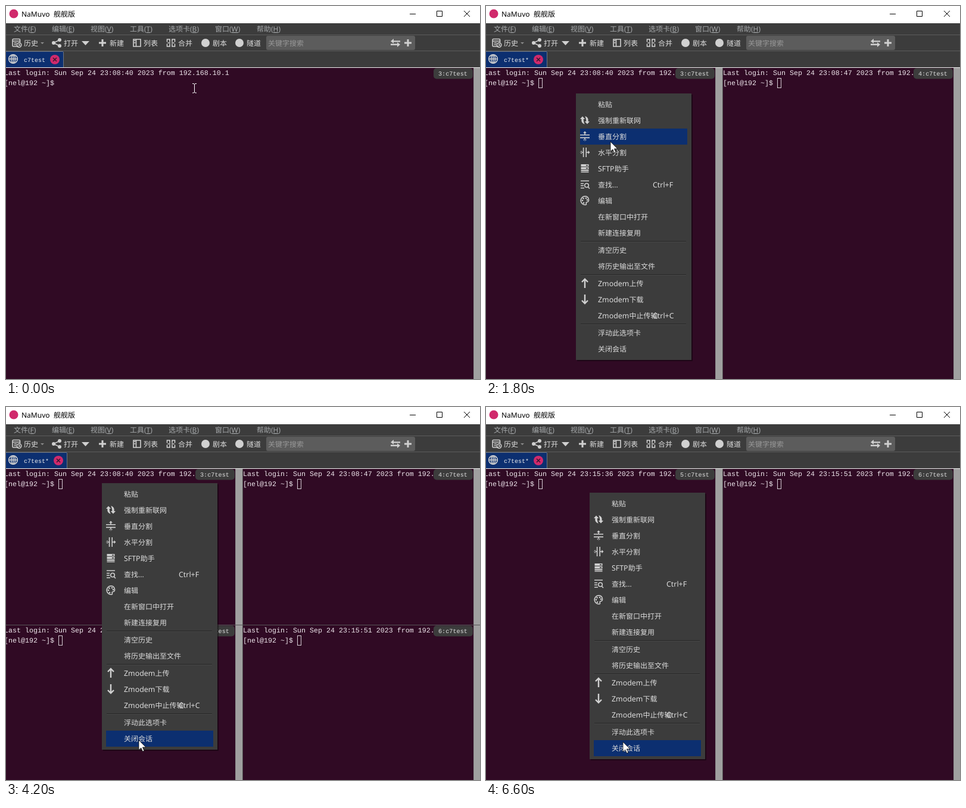
These frames come from a looping animation (796x627 px, 7.2 s). An HTML page:

```html
<!DOCTYPE html>
<html lang="zh-CN">
<head>
<meta charset="utf-8">
<title>Terminal panes</title>
<style>
html, body { margin: 0; width: 100%; height: 100%; overflow: hidden; background: #300a24; }
svg { display: block; }
text { font: 12px "Noto Sans", "Noto Sans CJK SC", "Noto Sans CJK", sans-serif; fill: #dcdcdc; text-rendering: geometricPrecision; white-space: pre; }
.latin { font-size: 12.4px; }
.title { fill: #000; }
.hint { fill: #999; }
.bar { fill: #a6a9ab; }
.term { font: 11.667px "Liberation Mono", monospace; fill: #eee6ec; }
.tag { font: 10.2px "Liberation Mono", monospace; fill: #e0e0e0; }
.tab { font: 10px "Liberation Mono", monospace; fill: #f0f0f0; }
.ico { fill: none; stroke: #d0d0d0; stroke-width: 1.6; }
.fill { fill: #d0d0d0; }
</style>
</head>
<body>
<svg width="796" height="627" viewBox="0 0 796 627">
  <g id="chrome"></g>
  <g id="scene"></g>
</svg>
<script>
const LOOP = 7200, STEP = 600;
const GREY = '#3c3c3c', BLUE = '#0c2f70', WINE = '#300a24', PINK = '#d02a6c', EDGE = '#565456';

const rect = (x, y, w, h, fill, more = '') =>
  `<rect x="${x}" y="${y}" width="${w}" height="${h}" fill="${fill}" ${more}/>`;
const text = (x, y, s, cls = '') => `<text x="${x}" y="${y}" class="${cls}">${s}</text>`;
const label = (x, y, s) => text(x, y, s.replace(/[A-Za-z+]+/g, '<tspan class="latin">$&</tspan>'));
const line = d => `<path class="ico" d="${d}"/>`;
const solid = d => `<path class="fill" d="${d}"/>`;
const dot = (x, y, r, fill) => `<circle cx="${x}" cy="${y}" r="${r}" fill="${fill}"/>`;
const at = (x, y, s) => `<g transform="translate(${x} ${y})">${s}</g>`;
const turn = (deg, s) => `<g transform="rotate(${deg})">${s}</g>`;

// Icons are drawn around their own centre.
const split = solid('M-8-3H8v1.6H-8zM-8 1.6H8v1.6H-8zM-.8-8h1.6v5h-1.6zM-.8 3h1.6v5h-1.6zM-3-5.4L0-8.4 3-5.4zM-3 5.4L0 8.4 3 5.4z');
const upArrow = '<path class="ico" style="stroke-width:2.4" d="M0 8V-6M-5-2L0-7 5-2"/>';
const hook = solid('M-4-6.5L.3-2H-2.300C-2.300 1.500-1.500 4-.3 6.700C-5 5.500-6.300 1.500-5.500-2H-8z');
const icons = {
  history: line('M3 6H-5.5Q-7 6-7 4.5V-5Q-7-6.5-5.5-6.5H4Q5.5-6.5 5.5-5V-1M-7-3H5.5M-4.5 0H0M-4.5 3H-1') +
    '<circle class="ico" cx="4" cy="3.5" r="3.7"/>' + line('M4 1.5V4H6'),
  share: line('M5-5L-5 0 5 5') + solid('M-8 0a3 3 0 1 0 6 0a3 3 0 1 0-6 0M2-5a3 3 0 1 0 6 0a3 3 0 1 0-6 0M2 5a3 3 0 1 0 6 0a3 3 0 1 0-6 0'),
  plus: solid('M-1.5-6h3v4.5H6v3H1.500V6h-3V1.500H-6v-3h4.500z'),
  list: line('M-6-6H6V6H-6zM-1.5-6V6') + solid('M-5-4.5h2.500V-3H-5zM-5-1h2.500V.5H-5z'),
  merge: line('M-6.5-1.5V-6H-2V-1.5M-6.5 1.5V6H-2V1.5M6.5-1.5V-6H2V-1.5M6.5 1.5V6H2V1.5M-5.5 0H-1M1 0H5.5'),
  disc: dot(0, 0, 7, '#d0d0d0'),
  swap: solid('M8-3.8H-3V-7L-8-2.8-3 1V-1.6H8zM-8 3.9H3V7L8 2.8 3-1V1.600H-8z'),
  globe: '<circle class="ico" r="7.3"/><ellipse class="ico" rx="3.4" ry="7.3"/>' + line('M-7 0H7M0-7V7'),
  redo: hook + turn(180, hook),
  rows: split,
  cols: turn(90, split),
  server: solid('M-6.5-7H6.5V-3.2H-6.5zM-6.5-2.2H6.5V1.600H-6.5zM-6.5 2.6H6.5V4.800H-6.5zM-6.5 5.700H6.5V7H-6.5z') +
    '<path d="M2-5H5M2-.3H5" stroke="#3c3c3c" stroke-width="1.4"/>',
  find: line('M-7-6H7M-7-1.5H-2M-7 2H-2M-7 6H-1M5 4L8 7') + '<circle class="ico" cx="3" cy="1.5" r="3.3"/>',
  palette: line('M0-7.2A7.2 7.2 0 1 0 2 7C4 6 0 3 4 2.5C8 2.5 7.5-7.2 0-7.2Z') +
    [[-4, 0], [-2.5, -3.5], [2, -4], [4, -1], [-2, 4]].map(p => dot(...p, 1.3, '#d0d0d0')).join(''),
  up: upArrow,
  down: turn(180, upArrow)
};

const menuBar = [[13, '文件', 'F'], [77, '编辑', 'E'], [142, '视图', 'V'], [208, '工具', 'T'],
  [273, '选项卡', 'B'], [351, '窗口', 'W'], [421, '帮助', 'H']];
const tools = [['history', 18, 30, '历史'], ['share', 85, 97, '打开'], ['plus', 162, 174, '新建'],
  ['list', 220, 231, '列表'], ['merge', 277, 289, '合并'], ['disc', 335, 347, '剧本'], ['disc', 392, 404, '隧道']];
const entries = [[18, '粘贴'], [45, '强制重新联网', 'redo'], [72, '垂直分割', 'rows'], [99, '水平分割', 'cols'],
  [126, 'SFTP助手', 'server'], [153, '查找...', 'find', 'Ctrl+F'], [180, '编辑', 'palette'],
  [207, '在新窗口中打开'], [234, '新建连接复用'], [263, '清空历史'], [290, '将历史输出至文件'],
  [319, 'Zmodem上传', 'up'], [346, 'Zmodem下载', 'down'], [373, 'Zmodem中止传输', '', 'Ctrl+C'],
  [402, '浮动此选项卡'], [429, '关闭会话']];

function chrome() {
  return rect(0, 0, 796, 29, '#fff') + dot(13, 13, 7.5, PINK) +
    text(26, 18, 'NaMuvo', 'title') + text(80, 18, '舰舰版', 'title') +
    '<path d="M678 13.5H688M723.5 8.5H732.5V17.5H723.5ZM769 8L779 18M779 8L769 18" fill="none" stroke="#000"/>' +
    rect(0, 29, 796, 75, GREY) + rect(0, 48, 796, 1, '#5c5c5c') + rect(0, 75, 796, 1, '#5c5c5c') +
    menuBar.map(([x, s, k]) => text(x, 43, `${s}(<tspan text-decoration="underline">${k}</tspan>)`, 'bar')).join('') +
    tools.map(([i, cx, x, s]) => at(cx, 62, icons[i]) + text(x, 66.5, s)).join('') +
    '<path d="M58 61H64L61 64Z" fill="#8c8c8c"/>' + solid('M127 59H140L133.5 66Z') +
    rect(437, 50, 250, 24, '#5c5c5c', 'rx="3"') + text(440, 66.5, '关键字搜索', 'hint') +
    at(654, 62, icons.swap) + at(675, 62, icons.plus);
}

function tab(many) {
  const w = many ? 103 : 97, c = w - 15;
  return rect(0, 76, w, 27, BLUE) + `<path d="M0 76.5H${w - 2}Q${w - .5} 76.5 ${w - .5} 78V103" fill="none" stroke="#6d7583"/>` +
    rect(0, 103, 796, 1, '#f0f0f0') + at(12, 89, icons.globe) + text(30, 93.5, many ? 'c7test*' : 'c7test', 'tab') +
    dot(c, 90, 8, PINK) + `<path d="M${c - 3} 87l6 6m0-6l-6 6" stroke="#3a1730" stroke-width="1.6"/>`;
}

const logins = { 3: '23:08:40', 4: '23:08:47', 5: '23:15:36', 6: '23:15:51' };

// cursor: 0 hidden, 1 outline, 2 block
function pane(id, x, y, right, h, cursor) {
  const tx = x ? 398 : -3, cx = tx + 91, cy = y + 17;
  const mark = ['', rect(cx + .5, cy + .5, 6, 16, 'none', 'stroke="#d6ced4"'), rect(cx, cy, 7, 17, '#b9b9b9')][cursor];
  return rect(x, y, right - x, h, WINE) +
    text(tx, y + 12, `Last login: Sun Sep 24 ${logins[id]} 2023 from 192.${right - x > 500 ? '168.10.1' : ''}`, 'term') +
    text(tx, y + 29, '[nel@192 ~]$', 'term') + mark +
    rect(right, y, 12, h, '#a0a0a0') + rect(right, y, 1, h, '#8a8a8a') +
    rect(right - 67, y + .5, 66, 18, GREY, 'rx="5"') + text(right - 59, y + 13, id + ':c7test', 'tag');
}

function column(ids, x, right, cursors) {
  const whole = ids.length < 2;
  return ids.map((id, i) => pane(id, x, 104 + 263 * i, right, whole ? 523 : 262, cursors[id] ?? 1)).join('') +
    (whole ? '' : rect(x, 366, right - x + 12, 1, EDGE));
}

function menu(x, y, pick) {
  return at(x, y, rect(2, 2, 194, 448, '#000', 'opacity=".4"') + rect(0, 0, 194, 448, GREY) +
    rect(7, entries[pick][0] - 13, 180, 27, BLUE) +
    [248, 304, 387].map(s => rect(8, s, 177, 1, '#262626') + rect(8, s + 1, 177, 1, '#484848')).join('') +
    entries.map(([c, s, i, key]) => (i ? at(15, c, icons[i]) : '') + label(37, c + 4.5, s) +
      (key ? label(129, c + 4.5, key) : '')).join(''));
}

const arrow = '<path d="M0 0V16.5L3.8 13 6.5 19 9 18 6.4 12H11.800Z" fill="#fff" stroke="#111" stroke-width=".8"/>';
const beam = '<path d="M-3-7.5H-1L.5-6.5 2-7.5H4M.5-6.5V7M-3 8H-1L.5 7 2 8H4" fill="none" stroke="#fff"/>';

// left panes, right panes, pointer, cursor overrides, [menu x, y, picked entry]
const steps = [
  [[3], [], [316, 138], { 3: 0 }],
  [[3], [], [373, 232], {}, [316, 137, 3]],
  [[3], [4], [373, 232], { 4: 2 }],
  [[3], [4], [209, 228], {}, [151, 147, 2]],
  [[3, 5], [4], [209, 228], { 5: 0 }],
  [[3, 5], [4], [621, 229], {}, [563, 155, 2]],
  [[3, 5], [4, 6], [621, 229], { 6: 2 }],
  [[3, 5], [4, 6], [223, 560], {}, [161, 128, 15]],
  [[5], [4, 6], [223, 560], {}],
  [[5], [4, 6], [617, 553], {}, [555, 132, 15]],
  [[5], [6], [617, 553], {}],
  [[5], [6], [230, 563], {}, [174, 144, 15]]
];

function scene([left, right, mouse, cursors, pop]) {
  const many = right.length > 0;
  return tab(many) + column(left, 0, many ? 385 : 785, cursors) +
    (many ? column(right, 397, 785, cursors) + rect(397, 104, 1, 523, EDGE) : '') +
    (pop ? menu(...pop) : '') + at(...mouse, pop ? arrow : beam);
}

document.getElementById('chrome').innerHTML = chrome();
const stage = document.getElementById('scene');
let shown = -1, start;

function tick(now) {
  start ??= now;
  const i = Math.floor(Math.max(0, now - start) % LOOP / STEP);
  if (i !== shown) stage.innerHTML = scene(steps[shown = i]);
  requestAnimationFrame(tick);
}
tick(performance.now());
</script>
</body>
</html>
```
